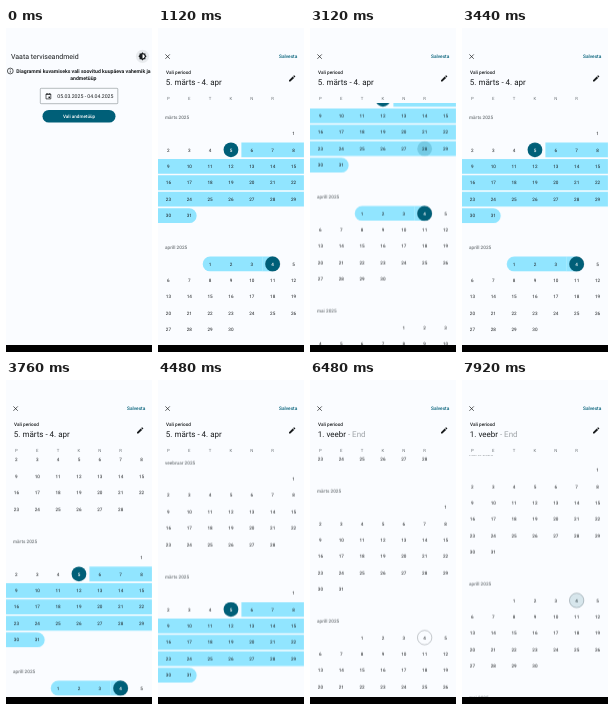
Animation of 146x324 px, one loop 8000 ms. Source, as an HTML page:

```html
<!DOCTYPE html>
<html lang="et">
<head>
<meta charset="utf-8">
<title>Vaata terviseandmeid</title>
<style>
  html, body { margin: 0; width: 100%; height: 100%; overflow: hidden; background: #fafcff; }
  svg { display: block; width: 146px; height: 324px; font-family: Roboto, sans-serif; fill: #191c1e; text-rendering: geometricPrecision; }
  .anim { animation: 8s linear infinite; }
  .mid { text-anchor: middle; }
  .bold { font-weight: 700; }
  .medium { font-weight: 500; }
  .grey { fill: #71777b; }
  .teal { fill: #005f78; }
  .white { fill: #fff; }
  .band { fill: #91e5ff; }
  .line { fill: none; stroke: #191c1e; stroke-width: .7; }
  .ripple { fill: #005f78; opacity: 0; transform-box: fill-box; transform-origin: center; }

  #dialog { animation-name: slide; }
  #cal { animation-name: scroll; }
  #press { animation-name: press; }
  .before { animation-name: before; }
  .after { animation-name: after; }
  #drag { animation-name: drag; }
  #tapStart { animation-name: tapStart; }
  #tapEnd { animation-name: tapEnd; }

  @keyframes slide {
    0%, 4% { transform: translateY(324px); animation-timing-function: cubic-bezier(.2, .6, .35, 1); }
    14%, 100% { transform: translateY(0); }
  }
  @keyframes scroll {
    0%, 32.5% { transform: translateY(89px); animation-timing-function: ease-in-out; }
    38.5%, 39.5% { transform: translateY(38.5px); animation-timing-function: cubic-bezier(.4, 0, .6, .9); }
    47% { transform: translateY(161px); animation-timing-function: cubic-bezier(.15, .5, .5, 1); }
    56% { transform: translateY(196.5px); animation-timing-function: cubic-bezier(.35, .1, .4, 1); }
    68%, 74% { transform: translateY(261px); animation-timing-function: cubic-bezier(.3, .2, .2, 1); }
    89%, 100% { transform: translateY(73.5px); }
  }
  @keyframes press {
    0%, 1% { opacity: 0; }
    3%, 5% { opacity: .1; }
    9%, 100% { opacity: 0; }
  }
  @keyframes before {
    0% { opacity: 1; animation-timing-function: step-end; }
    73%, 100% { opacity: 0; }
  }
  @keyframes after {
    0% { opacity: 0; animation-timing-function: step-end; }
    73%, 100% { opacity: 1; }
  }
  @keyframes drag {
    0%, 29% { opacity: 0; transform: scale(.3); }
    31% { opacity: .2; }
    33% { transform: scale(.55); }
    38% { transform: scale(1); }
    39.5% { opacity: .2; }
    42%, 100% { opacity: 0; transform: scale(1); }
  }
  @keyframes tapStart {
    0%, 69.5% { opacity: 0; transform: scale(.3); }
    71% { opacity: .18; }
    73% { opacity: .18; transform: scale(1); }
    76%, 100% { opacity: 0; transform: scale(1); }
  }
  @keyframes tapEnd {
    0%, 94% { opacity: 0; transform: scale(.3); }
    96% { opacity: .14; }
    98.5%, 100% { opacity: .14; transform: scale(1); }
  }
</style>
</head>
<body>
<svg viewBox="0 0 146 324">
  <defs>
    <clipPath id="view"><rect y="75.3" width="146" height="242"/></clipPath>
  </defs>

  <g id="home">
    <rect width="146" height="324" fill="#fafcff"/>
    <text x="5" y="30.7" font-size="7">Vaata terviseandmeid</text>
    <circle cx="136.5" cy="28.3" r="6.6" fill="#e8ebee"/>
    <path d="M136.5 24.2l1.2 1.2h1.7v1.7l1.2 1.2-1.2 1.2v1.7h-1.7l-1.2 1.2-1.2-1.2h-1.7v-1.7l-1.2-1.2 1.2-1.2v-1.7h1.7z"/>
    <path class="white" d="M136.5 26.2a2.1 2.1 0 0 1 0 4.2z"/>
    <circle class="line" cx="4.3" cy="43" r="2.9"/>
    <path class="line" d="M4.3 42.6v2.1M4.3 41.1v.7"/>
    <g class="mid bold" font-size="5.15">
      <text x="77.4" y="44.8">Diagrammi kuvamiseks vali soovitud kuupäeva vahemik ja</text>
      <text x="77.4" y="51.8">andmetüüp</text>
    </g>
    <rect x="34.3" y="60.3" width="77.5" height="15.4" rx=".8" fill="none" stroke="#70787d" stroke-width=".5"/>
    <rect id="press" class="anim" x="34.3" y="60.3" width="77.5" height="15.4" opacity="0"/>
    <path class="line" d="M40 66h4.8v4.9H40zM40 66.5h4.8M41.1 65v1M43.7 65v1"/>
    <rect x="42.5" y="68.6" width="1.5" height="1.5"/>
    <text x="51.3" y="69.9" font-size="5.2">05.03.2025 - 04.04.2025</text>
    <rect class="teal" x="36.5" y="82" width="73" height="12.6" rx="6.3"/>
    <text class="mid white medium" x="73" y="90" font-size="4.6">Vali andmetüüp</text>
    <rect y="317" width="146" height="7" fill="#000"/>
  </g>

  <g id="dialog" class="anim">
    <rect width="146" height="324" fill="#fafcff"/>
    <path class="line" d="M7.4 26.4l4.4 4.4M11.8 26.4l-4.4 4.4"/>
    <text class="teal medium" x="121" y="30.2" font-size="4.8">Salvesta</text>
    <text class="medium" x="8" y="46.1" font-size="4.7">Vali periood</text>
    <text class="anim before" x="7.8" y="57.3" font-size="8">5. märts - 4. apr</text>
    <text class="anim after" x="7.8" y="57.3" font-size="8">1. veebr <tspan fill="#9fa4a8">- End</tspan></text>
    <path d="M131 52.2l3.7-3.7 1.4 1.4-3.7 3.7H131zM135.1 48.1l.7-.7q.3-.3.6 0l.8.8q.3.3 0 .6l-.7.7z"/>
    <g id="week" class="mid grey" font-size="4.3"></g>
    <g clip-path="url(#view)">
      <g id="cal" class="anim">
        <g id="bands" class="anim before band"></g>
        <g id="days"></g>
        <g id="ends" class="anim before"></g>
        <g id="start" class="anim after"></g>
        <g id="touch"></g>
      </g>
    </g>
    <rect y="317" width="146" height="7" fill="#000"/>
  </g>
</svg>
<script>
  const COL = 20.85, ROW = 16.45, R = 7.4, DAY = 4.6;
  const NS = 'http://www.w3.org/2000/svg';
  const $ = id => document.getElementById(id);

  function add(parent, tag, attrs, text) {
    const el = document.createElementNS(NS, tag);
    for (const key in attrs) el.setAttribute(key, attrs[key]);
    if (text !== undefined) el.textContent = text;
    parent.appendChild(el);
    return el;
  }

  const colX = col => 10.4 + col * COL;

  // Offsets are measured from the centre line of the March title.
  const months = [
    { name: 'jaanuar', first: 3, days: 31 },
    { name: 'veebruar', first: 6, days: 28 },
    { name: 'märts', first: 6, days: 31 },
    { name: 'aprill', first: 2, days: 30 },
    { name: 'mai', first: 4, days: 31 }
  ];
  const [jan, feb, mar, apr] = months;
  const height = m => Math.ceil((m.first + m.days) / 7) * ROW + 31.8;
  let offset = -height(jan) - height(feb);
  for (const m of months) {
    m.y = offset;
    offset += height(m);
  }

  function place(m, day) {
    const i = m.first + day - 1;
    return { x: colX(i % 7), y: m.y + 16.4 + Math.floor(i / 7) * ROW };
  }

  function label(parent, p, day, cls = '') {
    add(parent, 'text', { class: 'mid ' + cls, x: p.x, y: p.y + 1.65, 'font-size': DAY }, day);
  }

  function disc(parent, m, day) {
    const p = place(m, day);
    add(parent, 'circle', { class: 'teal', cx: p.x, cy: p.y, r: R });
    label(parent, p, day, 'white medium');
  }

  function ripple(id, m, day) {
    const p = place(m, day);
    add($('touch'), 'circle', { id, class: 'anim ripple', cx: p.x, cy: p.y, r: R });
  }

  // One strip per week, rounded where the month begins or ends.
  function band(m, from, to) {
    for (let a = from; a <= to;) {
      const b = Math.min(to, a + 6 - (m.first + a - 1) % 7);
      const p = place(m, a), q = place(m, b);
      const roundL = a === 1, roundR = b === m.days;
      const l = p.x - (roundL ? R : COL / 2), r = q.x + (roundR ? R : COL / 2);
      const rl = roundL ? R : 0, rr = roundR ? R : 0;
      add($('bands'), 'path', {
        d: `M${l + rl} ${p.y - R}H${r - rr}a${rr} ${R} 0 0 1 0 ${2 * R}H${l + rl}a${rl} ${R} 0 0 1 0 ${-2 * R}z`
      });
      a = b + 1;
    }
  }

  [...'PETKNR'].forEach((c, i) => add($('week'), 'text', { x: colX(i), y: 71.6 }, c));

  for (const m of months) {
    add($('days'), 'text', { class: 'grey medium', x: 7, y: m.y + 1.7, 'font-size': 4.7 }, m.name + ' 2025');
    for (let d = 1; d <= m.days; d++) label($('days'), place(m, d), d);
  }

  const today = place(apr, 4);
  add($('days'), 'circle', { cx: today.x, cy: today.y, r: R - .2, fill: 'none', stroke: '#70787d', 'stroke-width': .4 });

  band(mar, 6, 31);
  // The last strip runs on under the end disc.
  band(apr, 1, 3);
  const end = place(apr, 4);
  add($('bands'), 'rect', { x: end.x - COL / 2, y: end.y - R, width: COL / 2, height: 2 * R });
  disc($('ends'), mar, 5);
  disc($('ends'), apr, 4);
  disc($('start'), feb, 1);
  ripple('drag', mar, 28);
  ripple('tapStart', feb, 1);
  ripple('tapEnd', apr, 4);
</script>
</body>
</html>
```
